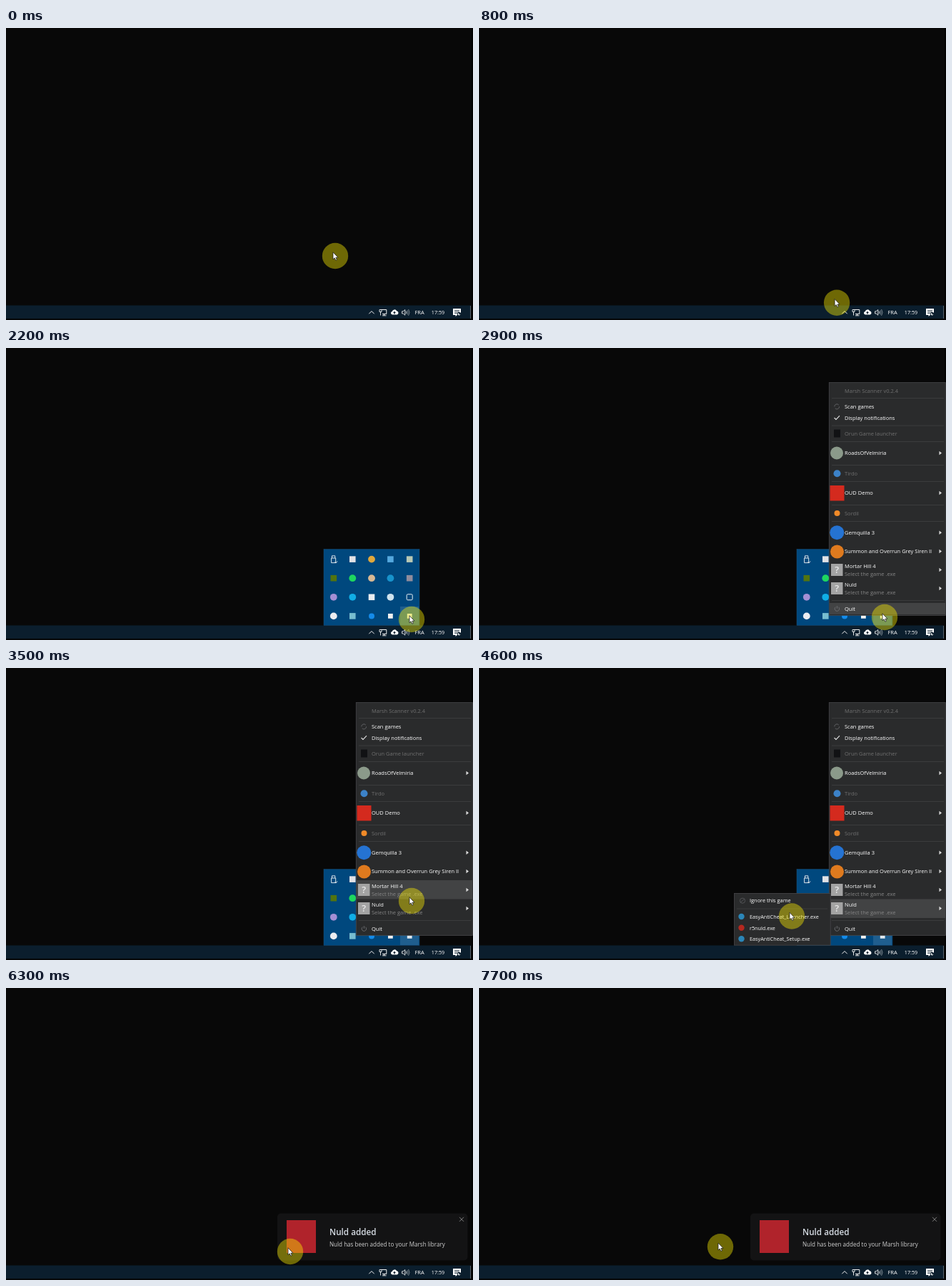
These frames come from a looping animation (654x410 px, 8 s). An HTML page:

```html
<!DOCTYPE html>
<html lang="en">
<head>
<meta charset="utf-8">
<title>Tray menu</title>
<style>
  html, body { margin: 0; width: 100%; height: 100%; overflow: hidden; background: #080808; }
  svg { display: block; width: 654px; height: 410px; }
  text { font-family: "Open Sans", "Noto Sans", sans-serif; font-size: 7.5px; fill: #fff; white-space: pre; }
</style>
</head>
<body>
<svg id="stage" viewBox="0 0 654 410" xmlns="http://www.w3.org/2000/svg"></svg>
<script>
const LOOP = 8000, STEP = 100;
const DIM = '#707070';

// Markup helpers
const rect = (x, y, w, h, fill, more = '') =>
  `<rect x="${x}" y="${y}" width="${w}" height="${h}" fill="${fill}" ${more}/>`;
const dot = (x, y, r, fill) => `<circle cx="${x}" cy="${y}" r="${r}" fill="${fill}"/>`;
const box = (x, y, r, fill) => rect(x - r, y - r, 2 * r, 2 * r, fill);
const line = (d, color, width = 1, more = '') =>
  `<path d="${d}" fill="none" stroke="${color}" stroke-width="${width}" ${more}/>`;
const shape = (d, fill) => `<path d="${d}" fill="${fill}"/>`;
const label = (x, y, s, fill = '#fff', size = 7.5, more = '') =>
  `<text x="${x}" y="${y}" style="fill:${fill};font-size:${size}px" ${more}>${s}</text>`;
const group = (id, body) => `<g id="${id}">${body}</g>`;

function taskbar() {
  return rect(0, 389.5, 651, 18.5, '#0b1e2d') + rect(0, 408, 654, 2, '#050607') +
    rect(652, 0, 2, 410, '#020202') + rect(650, 390, 1, 18, '#56626b') +
    line('M508.3 401.3L512 397.6L515.7 401.3', '#f2f2f2') +
    line('M525.5 395.5H532.8V401.5H527M529.5 401.5V403.8M527 403.8H532.5', '#f2f2f2') +
    line('M523 395.5H526V398.5H523ZM524.5 398.5V403.5', '#f2f2f2', .9) +
    shape('M541 402.6a2.4 2.4 0 0 1-.2-4.7a3.4 3.4 0 0 1 6.3-.7a2.8 2.8 0 0 1 .6 5.4z', '#fff') +
    shape('M544 397.8l2 2.2h-1.3v1.6h-1.4v-1.6h-1.3z', '#0b1e2d') +
    line('M554.7 397.8H556.3L558.8 395.6V403.2L556.3 401H554.7Z', '#f2f2f2', .9) +
    line('M560.4 397.7Q561.6 399.4 560.4 401.1', '#f2f2f2', .9) +
    line('M562 396.3Q564 399.4 562 402.5M563.6 395Q566.4 399.4 563.6 403.8', '#9aa4ab', .8) +
    label(572.5, 402.1, 'FRA') + label(595.8, 402.1, '17:59', '#fff', 7.2) +
    shape('M626 394H637V403H632L629.5 405V403H626Z', '#fff') +
    line('M628 396.5H635M628 398.6H635M628 400.6H632', '#0b1e2d', .8) +
    dot(634.6, 401.8, 2.7, '#0b1e2d') + dot(634.6, 401.8, 1.8, '#fff') + dot(635.5, 401.1, 1.4, '#0b1e2d');
}

function tray() {
  const xs = [458.8, 485.3, 512, 538.4, 565.2], ys = [296.6, 323.2, 349.8, 376.4];
  // Capitals are squares, small letters are circles
  const kinds = ['-S cSS', 'Scc cS', 'ccSc-', 'cScSS'].map(s => s.replace(/ /g, ''));
  const fills = [
    ['', '#e2e2e6', '#e0a83c', '#55a9df', '#b8c8b4'],
    ['#52740f', '#1ed760', '#d8b994', '#1793cc', '#8f8c9c'],
    ['#a58fd4', '#10aee6', '#e9edf0', '#cfe3ee', ''],
    ['#ececf0', '#77bdd0', '#148bea', '#f0f0f0', '#dfe8ee']];
  let out = rect(445, 282.5, 134, 107, '#00487e', 'stroke="#1d4f78" stroke-width=".5"') +
    rect(552, 363, 26, 26, '#fff', 'id="cell" opacity=".12"');
  ys.forEach((y, r) => xs.forEach((x, c) => {
    const kind = kinds[r][c], fill = fills[r][c];
    if (kind === 'S') out += box(x, y, r === 3 && c > 2 ? 3.4 : 4.3, fill);
    if (kind === 'c') out += dot(x, y, r === 3 && c === 2 ? 4 : 4.9, fill);
  }));
  return out +
    line('M456.5 295V291.8H460.8V295M455.6 295H461.7V301.6H455.6Z', '#f4f4f4', .9) +
    line('M460.5 300.4L462 302L464 299.4', '#f4f4f4', .9) +
    rect(561.2, 345.8, 8, 8, 'none', 'rx="1.5" stroke="#eef2f5"');
}

const arrow = y => shape(`M644.5 ${y - 2.8}L648 ${y}L644.5 ${y + 2.8}Z`, '#dcdcdc');
const unknown = y => rect(493, y - 8.5, 16.5, 17, '#a3a3a3') +
  label(501.2, y + 4.5, '?', '#e9e9e9', 13, 'text-anchor="middle" font-weight="600"');

function menu() {
  const seps = [70.5, 109, 131.5, 164.5, 187.5, 220.5, 243.5, 354.5];
  const heads = [[60, 'Marsh Scanner v0.2.4'], [120, 'Orun Game launcher'], [176, 'Tirdo'], [232, 'Sordil']];
  const items = [[82, 'Scan games'], [98, 'Display notifications'], [366, 'Quit']];
  const games = [[147.5, 'RoadsOfVelmiria'], [203.5, 'OUD Demo'], [259.3, 'Gemquilla 3'],
    [285.5, 'Summon and Overrun Grey Siren II']];
  const missing = [[311.5, 'Mortar Hill 4'], [337.5, 'Nuld']];
  const text = (list, color) => list.map(([y, s]) => label(512, y + 2.7, s, color)).join('');
  return rect(490.3, 48.5, 163, 327, '#2a2b2c', 'stroke="#46474a" stroke-width=".8"') +
    rect(491, 298, 162, 26, '#424344', 'id="hover"') +
    seps.map(y => rect(494, y - .4, 157, .8, '#3f4042')).join('') +
    text(heads, DIM) + text(items, '#fff') + text(games, '#fff') +
    games.map(([y]) => arrow(y)).join('') +
    missing.map(([y, s]) => unknown(y) + arrow(y) + label(512, y - 2.2, s) +
      label(512, y + 8.5, 'Select the game .exe', '#858585')).join('') +
    line('M497.8 82.3A3.4 3.4 0 0 1 503.8 80M504.6 82.2A3.4 3.4 0 0 1 498.8 84.8', '#66676a', .9) +
    line('M497.6 98L500 100.4L505 95.2', '#e4e4e4', 1.1) +
    line('M499.5 363.6A3.2 3.2 0 1 0 503.3 363.6M501.4 362.3V365.8', '#707174', .9) +
    rect(497, 114.5, 9, 11, '#111214') +
    dot(501.5, 176.2, 5, '#3c82c8') + dot(501.5, 232, 4, '#f08a28') +
    dot(501, 147.5, 9, '#8b9a8a') + rect(491.5, 193, 20, 21.5, '#d42a1e') +
    dot(501.3, 259.3, 10, '#2573d2') + dot(501.5, 286, 9.5, '#df7a1e');
}

function submenu() {
  return rect(357.4, 316.4, 134.8, 72.8, '#2a2b2c', 'stroke="#46474a" stroke-width=".8"') +
    rect(358, 357, 133.5, 15.5, '#424344', 'id="pick"') +
    rect(361, 337.6, 127, .8, '#3f4042') +
    line('M366 329.2L372 324.2', '#55565a', .9) +
    '<circle cx="369" cy="326.7" r="3.6" fill="none" stroke="#55565a" stroke-width=".9"/>' +
    label(379, 329.4, 'Ignore this game', '#fff', 7.4) +
    dot(367.5, 349, 4.2, '#2b86b8') + dot(367.5, 364.8, 4.2, '#b5281f') + dot(367.5, 380.2, 4.2, '#2b86b8') +
    label(379, 351.9, 'EasyAntiCheat_Launcher.exe', '#fff', 7.25) +
    label(379, 367.5, 'r5nuld.exe', '#fff', 7.25) +
    label(379, 383, 'EasyAntiCheat_Setup.exe', '#fff', 7.25);
}

function toast() {
  return rect(380, 316.5, 266.5, 66, '#131314', 'rx="5"') +
    rect(393, 326, 41, 46, '#b0232b') +
    label(453, 346.8, 'Nuld added', '#d6dce4', 11.7, 'font-weight="600"') +
    label(453, 362.6, 'Nuld has been added to your Marsh library', '#cfcfcf', 8.08) +
    line('M635 321.8L641 327.8M641 321.8L635 327.8', '#8c8c8c', .9);
}

function pointer() {
  return '<circle r="18.2" fill="#fff000" opacity=".41"/>' +
    '<path d="M-3 -5.2V4.8L-.8 2.8L.8 6.2L2.4 5.5L.9 2.2H4Z" fill="#fff" stroke="#111" stroke-width=".7"/>';
}

document.getElementById('stage').innerHTML =
  rect(0, 0, 654, 410, '#080808') + taskbar() + group('tray', tray()) + group('menu', menu()) +
  group('submenu', submenu()) + group('toast', toast()) + group('pointer', pointer()) +
  '<circle id="ring" fill="none" stroke="#ee7d12" stroke-width="1.9"/>';

const el = {};
document.querySelectorAll('[id]').forEach(n => el[n.id] = n);

// Pointer path: time, x, y
const path = [
  [0, 461, 320], [300, 461, 320], [1000, 511, 402], [1500, 511, 402], [2100, 568, 381],
  [2800, 568, 381], [3500, 568, 327], [3600, 568, 327], [3900, 568, 338], [4000, 568, 338],
  [4600, 438, 348.5], [4900, 402, 368], [5000, 402, 369], [6000, 402, 369], [6100, 398, 370],
  [6600, 398, 370], [6700, 391, 370], [7000, 391, 370], [7300, 368, 357], [7700, 338, 363.3], [LOOP, 338, 363.3]];
const clicks = [1000, 2200, 5200];

// Monotone cubic through the path points
function along(t, k) {
  let i = 0;
  while (i < path.length - 2 && t >= path[i + 1][0]) i++;
  const slope = j => path[j] && path[j + 1] ? (path[j + 1][k] - path[j][k]) / (path[j + 1][0] - path[j][0]) : 0;
  const tangent = j => {
    const a = slope(j - 1), b = slope(j);
    return a * b <= 0 ? 0 : 2 * a * b / (a + b);
  };
  const [p, q] = [path[i], path[i + 1]], h = q[0] - p[0], u = (t - p[0]) / h, v = 1 - u;
  return v * v * (1 + 2 * u) * p[k] + u * u * (3 - 2 * u) * q[k] +
    h * u * v * (v * tangent(i) - u * tangent(i + 1));
}

const show = (node, on) => node.setAttribute('display', on ? 'inline' : 'none');
const between = (t, a, b) => t >= a && t < b;

function draw(t) {
  const x = along(t, 1), y = along(t, 2), tip = y - 5;
  el.pointer.setAttribute('transform', `translate(${x} ${y})`);

  show(el.tray, between(t, 1100, 5300));
  show(el.cell, t >= 2000);
  show(el.menu, between(t, 2300, 5300));
  el.menu.setAttribute('opacity', t < 2400 ? .6 : 1);
  show(el.submenu, between(t, 4200, 5300));
  show(el.toast, t >= 6300);

  const rows = [[298, 324.5], [324.5, 351], [358, 374]];
  const row = x < 490 || t >= 4000 ? rows[1] : rows.find(([a, b]) => tip >= a && tip < b);
  show(el.hover, row);
  if (row) {
    el.hover.setAttribute('y', row[0]);
    el.hover.setAttribute('height', row[1] - row[0]);
  }
  show(el.pick, x < 490 && tip > 357);

  const start = clicks.find(c => between(t, c + 1, c + 400));
  show(el.ring, start);
  if (start) {
    const age = t - start;
    el.ring.setAttribute('cx', x - 3.3);
    el.ring.setAttribute('cy', y - 5.8);
    el.ring.setAttribute('r', 3 + age * .018);
    el.ring.setAttribute('opacity', Math.min(1, 1.4 - age / 400));
  }
}

const begin = performance.now();
function tick() {
  const t = (performance.now() - begin) % LOOP;
  draw(Math.floor(t / STEP) * STEP);
  requestAnimationFrame(tick);
}
tick();
</script>
</body>
</html>
```
